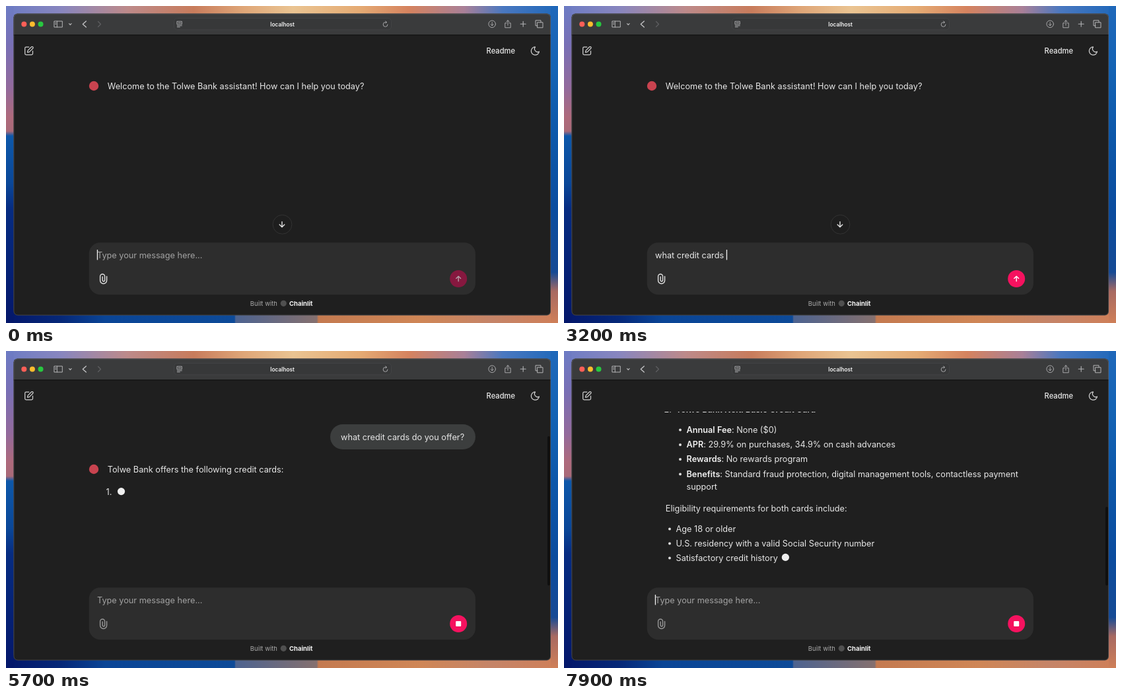
An HTML page with a canvas for the animation above (8000 ms loop, 836x480 px).

```html
<!DOCTYPE html>
<html lang="en">
<head>
<meta charset="utf-8">
<title>Assistant chat</title>
<style>
  html, body { margin: 0; width: 100%; height: 100%; overflow: hidden; background: #1f1f1f; }
  canvas { display: block; width: 836px; height: 480px; }
</style>
</head>
<body>
<canvas id="stage"></canvas>
<script>
const W = 836, H = 480, LOOP = 8000, STEP = 100;
const canvas = document.getElementById('stage');
const ctx = canvas.getContext('2d');
const dpr = window.devicePixelRatio || 1;
canvas.width = W * dpr;
canvas.height = H * dpr;

const SIZE = 12.71, VIEW_TOP = 92, TRACK = 260, SENT = 4400;
const PINK = '#f5125f', TEXT = '#e6e6e6', MUTED = '#a2a2a2';
const QUESTION = 'what credit cards do you offer?';

// kind, vertical centre in the page, text
const LINES = [
  ['p', 218, 'Tolwe Bank offers the following credit cards:'],
  ['1', 250, '**Tolwe Bank Tavelline Rewards Credit Card**'],
  ['b', 280.5, '**Annual Fee**: $99'],
  ['b', 303, '**APR**: 26.9% on purchases and cash advances'],
  ['b', 325, '**Rewards**: Earn 2 points per $1 spent, redeem for astronomy-related items and'],
  ['w', 344, 'experiences'],
  ['b', 366.5, '**Benefits**: Fraud monitoring, zero liability, invitations to exclusive events'],
  ['2', 396, '**Tolwe Bank Nelti Basic Credit Card**'],
  ['b', 426.5, '**Annual Fee**: None ($0)'],
  ['b', 449, '**APR**: 29.9% on purchases, 34.9% on cash advances'],
  ['b', 471, '**Rewards**: No rewards program'],
  ['b', 493.5, '**Benefits**: Standard fraud protection, digital management tools, contactless payment'],
  ['w', 512.5, 'support'],
  ['p', 545.5, 'Eligibility requirements for both cards include:'],
  ['u', 576.5, 'Age 18 or older'],
  ['u', 598.5, 'U.S. residency with a valid Social Security number'],
  ['u', 620.5, 'Satisfactory credit history ']
];
const INDENT = { p: 153.8, 1: 169.5, 2: 169.5, b: 185.5, w: 185.5, u: 169.5 };
const BULLET = { b: 176, u: 160 };

const lengthTo = n => LINES.slice(0, n).reduce((sum, l) => sum + l[2].length, 0);
const TYPING = [[1000, 0], [2100, 10], [3200, 18], [4300, 31]];
const STREAM = [
  [5530, 0], [5700, lengthTo(1)],
  [6700, lengthTo(7) + '**Tolwe Bank Nelti '.length],
  [7900, lengthTo(LINES.length)]
];

function interp(keys, t) {
  if (t <= keys[0][0]) return keys[0][1];
  for (let i = 1; i < keys.length; i++) {
    const [t0, v0] = keys[i - 1], [t1, v1] = keys[i];
    if (t <= t1) return v0 + (v1 - v0) * (t - t0) / (t1 - t0);
  }
  return keys[keys.length - 1][1];
}

const font = (size, weight) => `${weight} ${size}px Inter, "Open Sans", sans-serif`;

function text(str, x, y, color = TEXT, size = SIZE, weight = 400, align = 'left') {
  ctx.font = font(size, weight);
  ctx.textAlign = align;
  ctx.fillStyle = color;
  ctx.fillText(str, x, y + size * 0.36);
  return ctx.measureText(str).width;
}

function rect(x, y, w, h, r, fill, stroke) {
  ctx.beginPath();
  ctx.roundRect(x, y, w, h, r);
  if (fill) { ctx.fillStyle = fill; ctx.fill(); }
  if (stroke) { ctx.strokeStyle = stroke; ctx.lineWidth = 1; ctx.stroke(); }
}

function disc(x, y, r, fill, stroke) {
  rect(x - r, y - r, 2 * r, 2 * r, r, fill, stroke);
}

function icon(path, x, y, color, width = 1) {
  ctx.save();
  ctx.translate(x, y);
  ctx.strokeStyle = color;
  ctx.lineWidth = width;
  ctx.lineCap = ctx.lineJoin = 'round';
  ctx.stroke(new Path2D(path));
  ctx.restore();
}

function strip(x, y, w, h, stops) {
  const g = w > h ? ctx.createLinearGradient(0, 0, W, 0) : ctx.createLinearGradient(0, 0, 0, H);
  stops.forEach(([p, c]) => g.addColorStop(p, c));
  ctx.fillStyle = g;
  ctx.fillRect(x, y, w, h);
}

function wallpaper() {
  strip(0, 0, W, 20, [[0, '#6d7cc4'], [.1, '#8886bf'], [.22, '#bd8a8a'], [.34, '#c87c5c'],
    [.43, '#dfa678'], [.52, '#eac492'], [.64, '#e5ab74'], [.73, '#d5835f'],
    [.83, '#a98098'], [.9, '#4a78c0'], [1, '#1f68ba']]);
  strip(0, H - 20, W, 20, [[0, '#04176a'], [.1, '#062878'], [.18, '#0a4596'], [.414, '#0d4a98'],
    [.416, '#4d6390'], [.563, '#85706f'], [.566, '#c47a50'], [.75, '#cf8656'],
    [.88, '#c58468'], [1, '#cf7f58']]);
  strip(0, 0, 11.5, H, [[0, '#6d7cc4'], [.12, '#7870b6'], [.26, '#936a9c'], [.35, '#ae6a7c'],
    [.395, '#a96a78'], [.41, '#0d58aa'], [.56, '#0a4798'], [.64, '#062c82'], [1, '#04176a']]);
  strip(825, 0, 11, H, [[0, '#1f68ba'], [.2, '#1463b4'], [.4, '#0d58aa'], [.65, '#0b4c9e'],
    [.84, '#164a94'], [.9, '#a86a62'], [1, '#cf7f58']]);
}

function toolbar() {
  const c = '#b4b4b6';
  ['#ff5f57', '#febc2e', '#28c840'].forEach((col, i) => disc(27.3 + i * 12.6, 27.5, 4, col));
  icon('M-6-4.5h12v9h-12zM-2-4.5v9M-4.5-2h1M-4.5 0h1', 79.3, 27.5, c);
  icon('M-1.8-.8L0 1 1.8-.8', 97.3, 27.5, c, 1.2);
  icon('M2.5-4.5L-2.5 0 2.5 4.5', 118.8, 27.5, '#c6c6c8', 1.3);
  icon('M-2-4L2 0-2 4', 141.5, 27.5, '#5f5f62', 1.2);
  rect(254.5, 18.5, 329, 17.5, 5, '#373839', '#424345');
  icon('M-3.5-4h7v4.5h-7zM-3.5 2.5h7M-3.5 4.5h4M-2-1.8h4', 262.8, 27.3, c, .9);
  text('localhost', 418.7, 27.6, '#f2f2f2', 8.3, 600, 'center');
  icon('M3.3 0A3.4 3.4 0 1 1 0-3.4H1.6M.2-5L1.8-3.4.2-1.8', 574.7, 28, c, .9);
  icon('M5.3 0A5.3 5.3 0 1 1-5.3 0 5.3 5.3 0 1 1 5.3 0M0-2.6V2.4M-2 .5L0 2.5 2 .5', 736.2, 27.3, c, .9);
  icon('M-2-1.5H-4.2V5.5H4.2V-1.5H2M0 2V-5.5M-2.2-3.4L0-5.6 2.2-3.4', 760, 27.3, c, .9);
  icon('M-4 0H4M0-4V4', 783.2, 27.3, c, 1.1);
  icon('M-2.5-2.5h8v8h-8zM-2.5 2.5h-3v-8h8v3', 807.5, 27.3, c, 1);
}

function header() {
  icon('M0-5.8H-4.2Q-6-5.8-6-4V4Q-6 5.8-4.2 5.8H4Q5.8 5.8 5.8 4V0M-2.2 2.2L-1.6-.6 4-6.2Q5.2-6.8 6-6 6.8-5.2 6.2-4L.6 1.6Z',
    34.7, 68, '#cfcfcf', 1.25);
  text('Readme', 727.6, 68, '#ececec', 11.15, 500);
  icon('M0-6A4.7 4.7 0 0 0 6 1 6.1 6.1 0 1 1 0-6Z', 801.5, 68, '#d4d4d4', 1.25);
}

function avatar(y) {
  disc(133, y, 7.2, '#c8434f');
}

// Bold runs show their raw marks until they are closed.
function rich(str, x, y) {
  const parts = str.split('**');
  if (parts.length < 3) return text(str, x, y);
  let pos = x;
  parts.forEach((s, i) => { pos += text(s, pos, y, i % 2 ? '#f0f0f0' : TEXT, SIZE, i % 2 ? 600 : 400); });
  return pos - x;
}

function visibleLines(t) {
  if (t < STREAM[0][0]) return [];
  let left = Math.round(interp(STREAM, t));
  const out = [];
  for (const [kind, y, full] of LINES) {
    if (left >= full.length) {
      out.push({ kind, y, str: full });
      left -= full.length;
      continue;
    }
    const str = full.slice(0, full.lastIndexOf(' ', left - 1) + 1);
    if (left > 0 || kind !== 'w') out.push({ kind, y, str: left ? str : '' });
    break;
  }
  return out;
}

function conversation(t) {
  const lines = visibleLines(t);
  const last = lines[lines.length - 1];
  let max = 0, scroll = 0;
  if (t >= SENT) {
    max = 39;
    if (last) max = Math.max(max, last.y - (last.kind === '2' ? 311 : 313));
    const p = Math.min(1, (t - SENT) / 550);
    scroll = max * (1 - (1 - p) ** 2);
  }

  ctx.save();
  ctx.beginPath();
  ctx.rect(11, VIEW_TOP, 814, 264);
  ctx.clip();
  ctx.translate(0, -scroll);
  avatar(121);
  text('Welcome to the Tolwe Bank assistant! How can I help you today?', 153.8, 121.3);
  if (t >= SENT) {
    rect(491, 150, 220, 38, 19, '#3c3e3e');
    text(QUESTION, 507, 169);
  }
  if (last) avatar(218);
  for (const line of lines) {
    const { kind, str } = line;
    const x = INDENT[kind], y = line.y + (kind === '1' && !str ? 2.2 : 0);
    if (kind === '1' || kind === '2') text(kind + '.', 151.5, y);
    if (BULLET[kind]) disc(BULLET[kind], y + .4, 2, '#dedede');
    const w = rich(str, x, y);
    if (line === last) disc(x + (w ? w + 8 : 5), y - .6, 5.6, '#efefef');
  }
  ctx.restore();

  if (t >= SENT) {
    const total = max + TRACK;
    rect(820, 95 + scroll / total * TRACK, 4, TRACK * TRACK / total, 2, '#0f0f0f');
  } else {
    disc(418.5, 330.8, 14.4, '#1e1e1e', '#333');
    icon('M0-4V4M-3.8.4L0 4.2 3.8.4', 418, 330.6, '#e4e4e4', 1.4);
  }
}

function composer(t) {
  rect(125.7, 358.3, 585.3, 78.7, 17, '#2d2d2d');
  const count = t < SENT ? Math.floor(interp(TYPING, t) + 1e-6) : 0;
  const waiting = t >= SENT;
  let caret = 138.3;
  if (count) caret += text(QUESTION.slice(0, count), 138, 377) + .3;
  else text('Type your message here...', 138, 377, MUTED);

  const phase = (waiting ? t - SENT - 30 : t) % 670;
  if (count || phase < 335) {
    ctx.fillStyle = '#f2f2f2';
    ctx.fillRect(caret - .5, 369, 1.3, 15.5);
  }

  icon('M5-3.5V2.6A5 5 0 0 1-5 2.6V-3.4A3.5 3.5 0 0 1 2-3.4V2.4A1.7 1.7 0 0 1-1.4 2.4V-3',
    147.6, 412.9, waiting ? '#989898' : '#e2e2e2', 1.4);
  disc(685.2, 413, 13, count || waiting ? PINK : '#86183f');
  if (waiting) rect(681.2, 409, 8, 8, 1, '#fff');
  else icon('M0 3.8V-3.6M-3.4-.4L0-3.8 3.4-.4', 685.2, 413, count ? '#fff' : '#b4a0a8', 1.4);
}

function footer() {
  text('Built with', 369.8, 450.2, '#a9a9a9', 9.5);
  disc(420.3, 450.3, 4.6, '#505050');
  text('Chainlit', 429, 450.4, '#f4f4f4', 9.5, 700);
}

function draw(t) {
  ctx.setTransform(dpr, 0, 0, dpr, 0, 0);
  wallpaper();
  ctx.save();
  ctx.beginPath();
  ctx.roundRect(11.5, 11.5, 813.5, 457, 6);
  ctx.clip();
  ctx.fillStyle = '#1f1f1f';
  ctx.fillRect(11, 11, 815, 458);
  ctx.fillStyle = '#3a3b3c';
  ctx.fillRect(11, 11, 815, 32.5);
  ctx.fillStyle = '#101010';
  ctx.fillRect(11, 43.5, 815, 1);
  ctx.restore();
  rect(11.9, 11.9, 812.7, 456.2, 6, null, 'rgba(150,150,155,.32)');
  toolbar();
  header();
  conversation(t);
  composer(t);
  footer();
}

const start = performance.now();
function frame() {
  const t = (performance.now() - start) % LOOP;
  draw(Math.floor(t / STEP) * STEP);
  requestAnimationFrame(frame);
}
frame();
</script>
</body>
</html>
```
